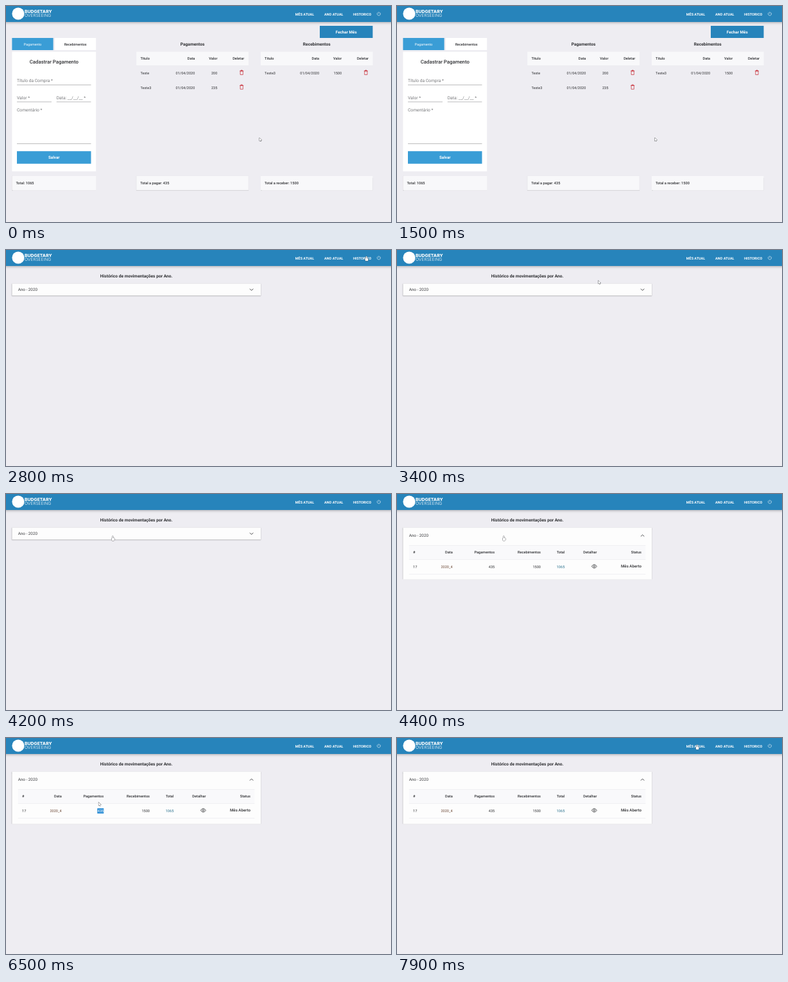
Recreate the animation shown at these times as an HTML page with a canvas. Size 600 by 338 pixels, loop 8000 ms.

```html
<!DOCTYPE html>
<html lang="pt-BR">
<head>
<meta charset="utf-8">
<title>Painel</title>
<style>
html, body { margin: 0; width: 100%; height: 100%; overflow: hidden; background: #eeedf2; }
canvas { display: block; width: 600px; height: 338px; }
</style>
</head>
<body>
<canvas id="stage"></canvas>
<script>
const LOOP = 8000, W = 600, H = 338, REM = W / 1536;
const PAGE_SWITCH = 2700, PANEL_OPEN = 4210, PANEL_TIME = 225;
const SELECT_ON = 5800, SELECT_OFF = 7000;
const INK = '#303134', MUTED = '#77787b', LINE = '#e2e3e8', PALE = '#f8f8fa';
const BLUE = '#2784bb', SKY = '#3a9dd6';
const SMALL = 14, BODY = 14.4, BUTTON = 16, TITLE = 17.1;
const LEFT = 9.4, FORM_W = 130.8, FIELD_X = 17, FIELD_W = 115.5, FORM_MID = LEFT + FORM_W / 2;
const PANEL_Y = 52.6, PANEL_W = 387.6;

const canvas = document.getElementById('stage');
const ctx = canvas.getContext('2d');
const ratio = window.devicePixelRatio || 1;
canvas.width = W * ratio;
canvas.height = H * ratio;

const links = [
  { label: 'MÊS ATUAL', x: 450.8 },
  { label: 'ANO ATUAL', x: 496 },
  { label: 'HISTORICO', x: 541 }
];

const moves = [
  { from: 1050, to: 1200, x: 401.6, y: 206 },
  { from: 1500, to: 2300, x: 566, y: 9 },
  { from: 2750, to: 3400, x: 313.8, y: 47.7 },
  { from: 3400, to: 3900, x: 166.3, y: 65.6 },
  { from: 4700, to: 5400, x: 208, y: 112 },
  { from: 5450, to: 5750, x: 147, y: 112 },
  { from: 6100, to: 6350, x: 144.4, y: 100.5 },
  { from: 6900, to: 7750, x: 467.6, y: 10.5 }
];

const mix = (a, b, k) => a + (b - a) * k;
const progress = (t, from, to) => Math.max(0, Math.min(1, (t - from) / (to - from)));
const smooth = k => k * k * (3 - 2 * k);

// cubic-bezier(.4, 0, .2, 1)
function standardEase(x) {
  let lo = 0, hi = 1;
  for (let i = 0; i < 20; i++) {
    const u = (lo + hi) / 2, v = 1 - u;
    if (3 * v * v * u * 0.4 + 3 * v * u * u * 0.2 + u ** 3 < x) lo = u; else hi = u;
  }
  return smooth(lo);
}

function cursorAt(t) {
  return moves.reduce((p, m) => {
    const k = smooth(progress(t, m.from, m.to));
    return { x: mix(p.x, m.x, k), y: mix(p.y, m.y, k) };
  }, { x: 395, y: 206 });
}

function rect(x, y, w, h, color) {
  ctx.fillStyle = color;
  ctx.fillRect(x, y, w, h);
}

function shadowed(x, y, w, h, color, blur, dy, alpha) {
  ctx.save();
  ctx.shadowColor = `rgba(0,0,0,${alpha})`;
  ctx.shadowBlur = blur * ratio;
  ctx.shadowOffsetY = dy * ratio;
  rect(x, y, w, h, color);
  ctx.restore();
}

// Text centred vertically on y; size in page pixels. Returns its width.
function text(str, x, y, size, { weight = 400, color = INK, align = 'left', family = 'Roboto' } = {}) {
  const px = size * REM;
  ctx.font = `${weight} ${px}px ${family}, sans-serif`;
  ctx.textAlign = align;
  ctx.fillStyle = color;
  ctx.fillText(str, x, y + px * 0.355);
  return ctx.measureText(str).width;
}

function stroke(color, width, draw) {
  ctx.strokeStyle = color;
  ctx.lineWidth = width;
  ctx.beginPath();
  draw();
  ctx.stroke();
}

function segment(x1, y1, x2, y2) {
  ctx.moveTo(x1, y1);
  ctx.lineTo(x2, y2);
}

function button(x, y, w, h, color, label, size, style) {
  rect(x, y, w, h, color);
  text(label, x + w / 2, y + h / 2 + 0.1, size, { color: '#fff', weight: 700, align: 'center', ...style });
}

function navBar() {
  shadowed(-4, -4, W + 8, 29, BLUE, 4, 1, 0.3);
  ctx.fillStyle = '#fff';
  ctx.beginPath();
  ctx.arc(19, 12, 9.6, 0, Math.PI * 2);
  ctx.fill();
  const brand = { color: '#fff', family: 'Inter' };
  text('BUDGETARY', 29, 8.8, 17.6, { ...brand, weight: 800 });
  text('OVERSEEING', 29, 14.7, 17, { ...brand, weight: 300 });
  for (const link of links) {
    link.width = text(link.label, link.x, 12.7, SMALL, { weight: 700, color: '#fff' });
  }
  stroke('#e6f1f8', 0.65, () => {
    ctx.arc(581, 12.3, 2.6, -Math.PI * 0.3, Math.PI * 1.3);
    segment(581, 9, 581, 12.2);
  });
}

function trash(x, y) {
  stroke('#c9323c', 0.75, () => {
    ctx.rect(x - 2.1, y - 2.3, 4.2, 5.8);
    ctx.rect(x - 1.1, y - 3.6, 2.2, 1.3);
    segment(x - 3.1, y - 2.3, x + 3.1, y - 2.3);
  });
}

function totalBox(x, w, label) {
  shadowed(x, 266, w, 22.2, PALE, 0.8, 0.3, 0.13);
  text(label, x + 6.1, 276.8, BODY, { weight: 500 });
}

function ledger(x, title, rows, total) {
  const width = 174.7;
  const cells = ([name, date, value], y, weight) => {
    text(name, x + 6.2, y, BODY, { weight });
    text(date, x + 91.2, y, BODY, { weight, align: 'right' });
    text(value, x + 126.2, y, BODY, { weight, align: 'right' });
  };
  text(title, x + width / 2, 60, TITLE, { weight: 700, align: 'center' });
  rect(x, 71.5, width, 22, PALE);
  rect(x, 93.3, width, 0.5, LINE);
  cells(['Titulo', 'Data', 'Valor'], 82.5, 500);
  text('Deletar', x + 168, 82.5, BODY, { weight: 500, align: 'right' });
  rows.forEach(([name, value], i) => {
    const y = 105 + i * 22.7;
    cells([name, '01/04/2020', value], y, 400);
    trash(x + 164, y - 1);
  });
  totalBox(x, width, total);
}

function field(label, x, y, w, lineY) {
  text(label, x, y, 17.2, { color: MUTED });
  rect(x, lineY, w, 0.6, '#8f8f92');
}

function monthPage() {
  button(489, 31, 82.5, 19, BLUE, 'Fechar Mês', BUTTON);
  button(LEFT, 50, 64.2, 19, SKY, 'Pagamento', SMALL, { weight: 400 });
  button(76, 50, 64.2, 19, '#fff', 'Recebimentos', SMALL, { weight: 500, color: INK });

  rect(LEFT, 71.7, FORM_W, 187, '#fff');
  text('Cadastrar Pagamento', FORM_MID, 87.6, 20, { weight: 500, align: 'center' });
  field('Título da Compra *', FIELD_X, 117, FIELD_W, 123);
  field('Valor *', FIELD_X, 143.3, 54, 149.7);
  field('Data: __/__/__ *', 78.7, 143.3, 53.8, 149.7);
  field('Comentário *', FIELD_X, 162.2, FIELD_W, 215.2);
  button(FIELD_X, 227.2, FIELD_W, 19.6, SKY, 'Salvar', BUTTON);
  totalBox(LEFT, FORM_W, 'Total: 1065');

  ledger(203.2, 'Pagamentos', [['Teste', '200'], ['Teste3', '235']], 'Total a pagar: 435');
  ledger(396.9, 'Recebimentos', [['Teste3', '1500']], 'Total a receber: 1500');
}

function eye(x, y) {
  stroke(INK, 0.8, () => {
    ctx.moveTo(x - 4, y);
    ctx.quadraticCurveTo(x, y - 5.8, x + 4, y);
    ctx.quadraticCurveTo(x, y + 5.8, x - 4, y);
    ctx.moveTo(x + 1.3, y);
    ctx.arc(x, y, 1.3, 0, Math.PI * 2);
  });
}

function historyTable(selected) {
  const x = 18.8, width = 368.6, headY = 91.4, rowY = 114;
  const column = (right, label, value, color = INK) => {
    text(label, right, headY, BODY, { weight: 500, align: 'right' });
    text(value, right, rowY, BODY, { color, align: 'right' });
  };
  rect(x, 80.8, width, 21.6, '#f9f9fb');
  for (const y of [80.5, 102.2, 125.2]) rect(x, y, width, 0.5, LINE);
  if (selected) rect(142.3, 110, 10, 8.2, '#2f8fd6');

  text('#', 25, headY, BODY, { weight: 500 });
  text('17', 25, rowY, BODY);
  column(86.7, 'Data', '2020_4', '#6b4632');
  column(152.2, 'Pagamentos', '435', selected ? '#fff' : INK);
  column(224, 'Recebimentos', '1500');
  column(261.3, 'Total', '1065', '#27708c');
  column(311.5, 'Detalhar', '');
  column(381, 'Status', '');
  text('Mês Aberto', 381, 112.5, 15.8, { weight: 500, align: 'right' });
  eye(307.4, 113.2);
}

function historyPage(t) {
  const open = standardEase(progress(t, PANEL_OPEN, PANEL_OPEN + PANEL_TIME));
  const height = mix(18.7, 82, open), middle = mix(62, 65.2, open);
  text('Histórico de movimentações por Ano.', LEFT + PANEL_W / 2, 40.9, TITLE, { weight: 700, align: 'center' });
  shadowed(LEFT, PANEL_Y, PANEL_W, height, '#fdfdfd', 1.4, 0.7, 0.32);
  text('Ano - 2020', 18.7, middle, 16.2, { color: '#3c3d40' });

  const tip = mix(1.35, -1.35, open);
  stroke('#4f5053', 1, () => {
    ctx.moveTo(379.9, middle - tip);
    ctx.lineTo(382.6, middle + tip);
    ctx.lineTo(385.3, middle - tip);
  });

  if (open > 0) {
    ctx.save();
    ctx.beginPath();
    ctx.rect(LEFT, PANEL_Y, PANEL_W, height);
    ctx.clip();
    historyTable(t >= SELECT_ON && t < SELECT_OFF);
    ctx.restore();
  }
}

function isLink({ x, y }, t) {
  const onNav = y > 7 && y < 18 && links.some(link => x >= link.x && x <= link.x + link.width);
  const panelEnd = PANEL_Y + (t < PANEL_OPEN ? 18.7 : 25);
  return onNav || (t >= PAGE_SWITCH && x < LEFT + PANEL_W && y > PANEL_Y && y < panelEnd);
}

function handPath() {
  ctx.roundRect(-0.7, 0, 1.4, 5, 0.7);
  ctx.roundRect(-1.7, 3.1, 4.4, 4.3, 1.2);
}

function arrowPath() {
  ctx.moveTo(0, 0);
  ctx.lineTo(0, 5.3);
  ctx.lineTo(1.3, 4.3);
  ctx.lineTo(2.2, 6);
  ctx.lineTo(2.2, 3.9);
  ctx.lineTo(3.8, 3.9);
  ctx.closePath();
}

function cursor(t) {
  const spot = cursorAt(t);
  ctx.save();
  ctx.translate(spot.x, spot.y);
  ctx.lineJoin = 'round';
  ctx.beginPath();
  if (isLink(spot, t)) handPath(); else arrowPath();
  ctx.lineWidth = 0.9;
  ctx.strokeStyle = '#55565a';
  ctx.stroke();
  ctx.fillStyle = '#fff';
  ctx.fill();
  ctx.restore();
}

function frame(now) {
  const t = now % LOOP;
  ctx.setTransform(ratio, 0, 0, ratio, 0, 0);
  ctx.textRendering = 'geometricPrecision';
  rect(0, 0, W, H, '#eeedf2');
  if (t < PAGE_SWITCH) monthPage(); else historyPage(t);
  navBar();
  cursor(t);
  requestAnimationFrame(frame);
}
requestAnimationFrame(frame);
</script>
</body>
</html>
```
